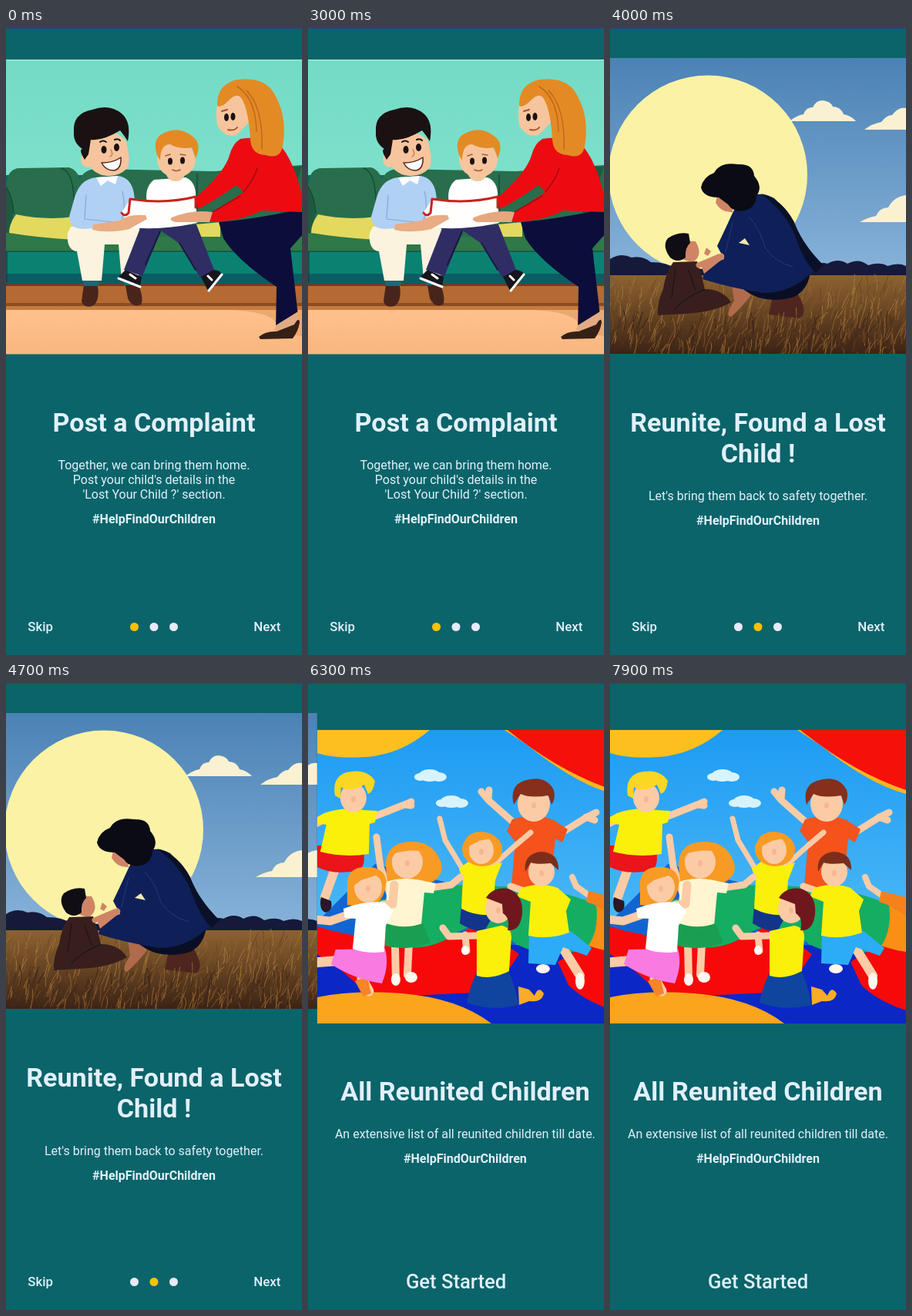
An HTML page for the animation above (8000 ms loop, 384 px wide and 814 px high).

```html
<!DOCTYPE html>
<html lang="en">
<head>
<meta charset="utf-8">
<title>Onboarding</title>
<style>
  html, body { margin: 0; width: 100%; height: 100%; overflow: hidden; background: #0b6469; }
  #stage { display: block; width: 100%; height: 100%; }
  text { font-family: Roboto, sans-serif; font-size: 16px; fill: #e1f0fc; }
  .mid { text-anchor: middle; }
  .title { font-size: 34.13px; font-weight: 700; }
  .tag { font-weight: 700; }
  .nav { font-size: 16.8px; font-weight: 500; }
  .start { font-size: 25.6px; font-weight: 500; }
</style>
</head>
<body>
<svg id="stage" viewBox="0 0 384 814"></svg>
<script>
const W = 384, LOOP = 8000;
const swipes = [3098, 5921];
const stage = document.getElementById('stage');

// Drawing helpers
const fill = (color, d) => `<path fill="${color}" d="${d}"/>`;
const line = (color, w, d) =>
  `<path fill="none" stroke="${color}" stroke-width="${w}" stroke-linecap="round" stroke-linejoin="round" d="${d}"/>`;
const oval = (color, x, y, rx, ry = rx) => `<ellipse fill="${color}" cx="${x}" cy="${y}" rx="${rx}" ry="${ry}"/>`;
const rect = (color, x, y, w, h) => `<rect fill="${color}" x="${x}" y="${y}" width="${w}" height="${h}"/>`;
const label = (cls, y, s, x = W / 2) => `<text class="${cls}" x="${x}" y="${y}">${s}</text>`;
const fade = (id, from, to) =>
  `<linearGradient id="${id}" x2="0" y2="1"><stop stop-color="${from}"/><stop offset="1" stop-color="${to}"/></linearGradient>`;
const picture = (y, h, parts) =>
  `<svg y="${y}" width="${W}" height="${h}" viewBox="0 ${y} ${W} ${h}">${parts.join('')}</svg>`;

let seed = 7;
const rnd = () => (seed = seed * 16807 % 2147483647) / 2147483647;

function family() {
  const skin = '#f6c59d', ink = '#1b1113', hair = '#e48a25';
  return picture(41, 382.5, [
    rect('url(#mint)', 0, 41, W, 150),
    // Sofa and floor
    fill('#286e4c', 'M0 204Q2 182 18 182L82 181Q92 184 96 196Q102 183 118 183L270 186L384 178V292H0Z'),
    fill('#1f5a40', 'M0 206Q8 218 10 240L4 266L0 268ZM358 180Q350 205 356 240H384V232Q370 215 384 180Z'),
    fill('#2f7848', 'M0 266Q45 274 90 271H384V291H0Z'),
    line('#174a36', 1.5, 'M0 206Q9 220 10 240M72 182Q90 188 88 238M248 190V248'),
    fill('#e3d95e', 'M13 242Q50 250 88 245V275Q40 272 4 266Q4 254 13 242ZM246 255L278 252V271H246Z'),
    rect('#0a8272', 0, 290, W, 32), rect('#0c5c63', 0, 319, W, 15),
    line('#123d38', 1.2, 'M0 290H384M1 290V330'),
    rect('#68401f', 0, 332, W, 4), rect('#b46a32', 0, 335, W, 25),
    rect('#8c4c20', 0, 357, W, 5), rect('#c67b3f', 0, 361, W, 5),
    rect('url(#floor)', 0, 366, W, 58),
    fill('#e9a970', 'M290 366Q340 368 350 382Q362 398 384 400V366Z'),
    // Man
    fill('#49241b', 'M101 333L119 335Q122 355 112 361Q101 364 98 355ZM155 334L172 333Q179 352 175 359Q164 364 158 351Z'),
    fill('#176a75', 'M99 321H123L120 335H101ZM150 321H172V334H154Z'),
    fill('#fbf3de', 'M84 258L165 252Q180 262 174 282L172 327H150L146 281H128L124 328H99L92 290Q78 288 80 266Z'),
    fill('#b0d1f4', 'M117 194Q96 196 89 220L82 245Q82 260 99 261L158 257Q170 240 166 215Q163 195 146 192Z'),
    line('#86a9d2', 1.2, 'M104 217L102 248L140 252M150 250Q156 230 151 212'),
    fill('#fff', 'M117 194L123 205L132 198L142 203L145 192Z'),
    oval(skin, 106, 171, 9, 10),
    fill(skin, 'M102 143Q130 124 155 145Q162 168 158 181Q148 193 131 192Q109 190 103 166Z'),
    fill(ink, 'M102 171Q94 158 99 157Q87 149 88 135Q86 111 112 106Q134 98 150 111Q163 122 158 147Q153 139 148 133Q125 147 110 145L107 164Z'),
    line(ink, 2, 'M122 148Q126 145 130 148M141 145Q145 143 148 146'),
    oval(ink, 127, 158, 3.5, 5), oval(ink, 143.5, 155, 3.5, 5),
    line('#cb7d59', 1.5, 'M136 158Q140 165 135 167'),
    fill('#fff', 'M124 175Q139 175 149 168Q150 183 140 185Q129 185 124 175Z'),
    line('#592018', 1.5, 'M124 175Q139 175 149 168Q150 183 140 185Q129 185 124 175Z'),
    // Boy
    fill('#fff', 'M192 197Q179 207 183 228L246 224Q248 200 233 194Z'),
    fill(skin, 'M207 189H233Q229 199 220 199Q211 199 207 189Z'),
    oval(skin, 221, 171, 25, 23),
    fill(hair, 'M196 165Q190 147 200 139Q222 125 241 140Q255 149 246 169L241 155Q225 158 213 151Q200 151 200 172Z'),
    oval(ink, 213, 173, 3, 4.5), oval(ink, 229, 172, 3, 4.5),
    line('#a85d3b', 1.5, 'M216 184Q221 187 226 184M207 166L213 164M226 164L233 165'),
    fill('#302d65', 'M174 260L247 255L270 314L252 324L225 280L201 263L177 322L153 314Z'),
    line('#171944', 2, 'M200 264L181 307M225 279L246 314'),
    fill('#17151d', 'M155 314L176 323L174 335L145 324ZM253 323L269 314Q282 315 278 322L262 341Z'),
    line('#fff', 3, 'M146 325L174 336M280 320L263 341M161 320L168 325M262 322L267 327'),
    // Book
    fill('#fffefd', 'M161 223Q204 228 246 218L248 253Q204 263 160 259L150 239Z'),
    line('#c9231e', 3, 'M150 240Q154 246 159 240L161 222Q207 229 246 219V233'),
    fill('#e9ac83', 'M113 255L148 250Q158 241 181 243L183 248L160 261Q132 267 112 262Z'),
    // Woman
    fill('#0c0d3b', 'M276 252Q324 248 384 235V269L369 286L379 374L350 391L351 336Q300 302 282 273Z'),
    fill('#e3ab84', 'M350 386L379 368L379 383L369 397L347 395Z'),
    fill('#352015', 'M328 401Q337 393 351 394L374 385Q380 374 381 382Q379 394 372 403L330 404Z'),
    fill('#ed0b12', 'M304 144Q332 139 356 153Q372 170 384 216V239L332 237Q299 253 264 251L268 239L308 213L299 204Q270 225 249 235L246 220Q284 187 290 165Q294 150 304 144Z'),
    line('#a30a14', 1.5, 'M308 213Q322 196 326 182M268 239L304 218'),
    fill('#e6a780', 'M268 239Q242 235 215 246Q211 250 220 252L264 252Z'),
    fill(skin, 'M279 84Q270 102 274 126Q283 143 299 139L318 120L309 87Z'),
    fill(hair, 'M274 101Q273 73 300 67Q339 62 351 91Q365 118 359 153Q356 171 337 165Q318 164 317 145Q315 108 306 92Q300 82 288 95Q279 104 274 101Z'),
    line('#bf681c', 1.5, 'M312 81Q334 104 332 157M300 76Q324 91 325 134'),
    oval(ink, 286, 116, 3, 5), oval(ink, 294.5, 115, 3, 5),
    line('#a84f32', 2, 'M288 132Q296 134 300 129M280 108L287 106'),
    rect('#c9f0e7', 0, 41, W, 1)
  ]);
}

function field() {
  const skin = '#cf8565', black = '#0b0b15', dress = '#0f1f58', cream = '#faf1d2';
  const grass = (n, top, span, tones) => Array.from({ length: n }, () => {
    const x = rnd() * 400 - 8, y = top + rnd() * span, h = 8 + rnd() * 18;
    return line(tones[Math.floor(rnd() * tones.length)], 1,
      `M${x.toFixed(1)} ${y.toFixed(1)}q${(rnd() * 5).toFixed(1)} ${(-h / 2).toFixed(1)} ${(rnd() * 13 - 2).toFixed(1)} ${(-h).toFixed(1)}`);
  }).join('');
  return picture(39, 384, [
    rect('url(#dusk)', 0, 39, W, 284),
    oval('#fbf2a6', 127, 190.5, 129, 129),
    fill(cream, 'M233 121Q241 114 251 112Q254 103 263 103Q267 94 276 94Q286 95 289 102Q299 102 303 112Q313 114 319 121Z'),
    fill(cream, 'M330 132Q340 124 352 122Q359 113 366 113Q374 102 384 104V132Z'),
    fill(cream, 'M324 252Q334 246 345 244Q350 233 361 233Q368 219 384 217V252Z'),
    fill('#151a3a', 'M0 300Q14 291 28 298Q42 295 53 304Q74 304 84 312L256 315Q270 302 282 306Q296 298 308 306Q323 298 335 308Q350 303 360 309Q374 304 384 309V324H0Z'),
    rect('url(#soil)', 0, 321, W, 104),
    grass(260, 340, 45, ['#8f6430', '#6b4723', '#a0743a', '#7c5429']),
    grass(190, 385, 40, ['#7c5026', '#57371d', '#44291a', '#8f6230']),
    // Mother
    fill('#4f251f', 'M211 347L244 346Q258 370 246 377L206 372Z'),
    fill('#b06a4c', 'M158 334L187 342Q171 363 157 375Q148 374 161 354Z'),
    fill('#0a0e25', 'M160 318L260 304Q262 337 239 349Q200 360 174 340Z'),
    fill(dress, 'M160 238Q184 205 213 221Q236 242 252 282L272 309L258 321Q232 344 199 344Q154 337 120 326L126 306L148 300L139 283Q150 260 160 238Z'),
    fill('#0a1027', 'M196 215Q223 222 239 252Q249 280 277 308L267 318Q251 303 241 272Q229 240 196 215Z'),
    line('#25397b', 1, 'M180 245Q194 259 201 285Q214 304 237 310M159 253L150 290'),
    fill('#f1e9aa', 'M167 279L175 273L181 282Z'),
    fill(skin, 'M125 285L131 290L127 296L122 293ZM118 308L145 292Q153 297 142 303L122 319Z'),
    fill(skin, 'M140 213L158 212L159 239Q144 240 137 227Z'),
    fill(black, 'M141 220Q121 220 118 207Q121 193 135 188Q143 173 166 177Q186 176 187 192Q199 206 190 218Q189 234 174 237Q160 240 153 229Z'),
    // Child
    fill(skin, 'M91 276L111 277Q121 294 109 303Q92 304 87 291Z'),
    fill('#100d15', 'M102 267L104 279Q97 285 98 298Q88 306 78 298Q67 283 75 273Q88 264 102 267Z'),
    fill('#381f1d', 'M82 304Q72 317 69 339Q61 356 62 373L97 371Q136 369 157 356Q146 339 123 339Q119 320 113 303Z'),
    line('#221519', 1.5, 'M85 312L80 350M122 340Q100 348 85 364M102 315L111 340'),
    line(skin, 7, 'M115 308L141 297'),
    grass(170, 388, 48, ['#94642f', '#4a2e19', '#7d5127', '#382217'])
  ]);
}

function party() {
  const skin = '#fbcba6', ginger = '#f89b24', lemon = '#fbf00a', brown = '#7c2e1b';
  const limb = (d, w = 9) => line(skin, w, d);
  const face = (x, y, r = 17) => oval(skin, x, y, r, r + 2) + oval('#f7b697', x, y + 2, 3, 4);
  const puff = (x, y) => oval('#d8f3fb', x, y, 14, 8) + oval('#d8f3fb', x + 12, y + 2, 10, 6) + oval('#d8f3fb', x - 12, y + 2, 8, 5);
  return picture(61, 381, [
    rect('url(#day)', 0, 61, W, 381),
    fill('#fcbf1f', 'M0 61H146Q110 92 65 96Q25 99 0 91Z'),
    fill('#fcb51f', 'M243 61L272 80Q335 131 384 144V61Z'),
    fill('#f5100a', 'M247 61H384V139Q315 116 247 61Z'),
    puff(146, 120), puff(174, 154),
    // Parachute
    fill('#1265d1', 'M75 235L180 262L250 285L260 350H0V310Z'),
    fill('#0b27c6', 'M0 340H384V442H0Z'),
    fill('#f7090a', 'M0 316Q45 331 91 330Q172 349 205 310L262 352L250 370L205 402L120 406L62 400L30 372L0 352Z'),
    fill('#f7090a', 'M312 362L352 338L384 342V425Q345 412 326 392Z'),
    fill('#15ad62', 'M78 283Q130 267 190 262L266 265Q327 270 366 290Q364 327 352 345Q300 360 260 340Q213 303 182 324Q140 354 92 338Z'),
    fill('#f98f14', 'M362 288L384 294V349Q365 346 352 341Q366 320 362 288Z'),
    fill('#fba51c', 'M0 408Q48 398 110 403Q183 409 226 442H0Z'),
    // Back left
    limb('M24 239L10 278', 12), fill('#2b1725', 'M5 278L18 283Q21 295 11 298Q2 295 5 278Z'),
    fill('#ea141a', 'M0 211H55Q66 226 57 242Q25 251 0 239Z'),
    limb('M70 175L113 158L122 154M113 158L122 159M8 178L-4 184'),
    fill(lemon, 'M9 169Q34 160 61 165L78 166L75 181L68 183L67 222Q34 227 4 219L12 184L0 182V174Z'),
    face(47, 149), fill('#fbd622', 'M23 146Q19 122 38 116Q64 110 75 127Q73 142 66 144L61 132Q43 143 31 135L30 150Z'),
    // Back right
    limb('M258 184L222 152L213 141M222 150L223 139'), limb('M318 194L350 174L362 168M349 174L360 178'),
    fill('#f4531c', 'M253 177Q282 168 307 178L325 190L318 207L309 202L304 250Q278 270 252 264L257 206L246 192Z'),
    face(281, 157, 21), fill('#862f1c', 'M255 158Q249 134 268 127Q296 118 307 139Q310 150 304 158L300 146Q276 150 264 144Z'),
    // Centre
    limb('M192 327L194 348', 9), oval('#fff', 192, 347, 5, 6),
    fill('#12358b', 'M187 289L231 297L216 324Q197 320 185 312Z'),
    limb('M189 242L166 204L159 176M228 237L257 211L277 194', 7),
    fill(lemon, 'M184 241L196 232L227 237L240 233L231 256L228 301Q206 303 187 293L189 256Z'),
    oval(ginger, 214, 216, 26, 22), face(213, 217, 16), fill(ginger, 'M191 215Q189 194 213 193Q237 195 237 214L224 202L210 205Z'),
    // Middle left
    limb('M101 338L102 382M119 338L117 379', 10), oval('#fff6ef', 102, 385, 6, 8), oval('#fff6ef', 122, 382, 8, 7),
    limb('M94 273L82 238L77 200M139 267L174 262L186 252'),
    fill(ginger, 'M89 237Q89 207 121 206Q150 205 160 231Q167 249 148 259Q117 269 91 257Z'),
    fill('#fff6d1', 'M90 258Q113 250 143 258L154 260L151 273L139 272L135 315Q111 321 88 313L90 275Z'),
    fill('#1a9f52', 'M87 311Q112 321 137 312L147 337Q116 349 88 341Z'),
    face(117, 232, 20), fill(ginger, 'M92 236Q92 207 118 208Q145 211 143 238L132 218Q119 216 101 221Z'),
    // Right
    limb('M318 343L341 380', 12), oval('#fff6ef', 341, 387, 6, 11), oval('#fff6ef', 293, 371, 9, 6),
    limb('M274 272L251 264'),
    fill('#2cacf6', 'M275 326L329 322L356 344L350 354L319 343L309 366L274 364Z'),
    fill(lemon, 'M265 266Q290 258 312 266L329 281L323 296L327 324Q299 334 274 328L277 284L259 277Z'),
    face(291, 245), fill(brown, 'M270 245Q267 222 290 219Q314 220 313 243L303 234Q284 236 277 233Z'),
    // Edge
    limb('M356 278L336 264L331 252', 8),
    fill('#f5801c', 'M352 270L384 278V302L360 288L349 284Z'),
    // Front left
    limb('M33 360L-3 363M58 384L67 400', 13), fill('#f58526', 'M49 387L65 381L70 403L60 407Z'),
    fill('#f97be2', 'M24 346L88 345Q94 366 84 390Q49 385 18 365Z'),
    limb('M43 300L17 309L-3 307M85 288L98 287L100 262', 11),
    fill(ginger, 'M39 258Q41 238 65 239Q91 240 89 262Q87 282 70 292L39 288Z'),
    fill('#fff', 'M34 293Q62 282 88 285L99 296L89 315L87 349Q63 352 46 345L50 306L36 305Z'),
    face(66, 265, 18), fill(ginger, 'M41 268Q42 238 65 239Q88 239 90 260L76 250L57 256Z'),
    // Front centre
    limb('M207 328L171 329L163 318'),
    fill('#f9ac28', 'M261 394L275 398L282 406Q287 392 294 403Q292 415 275 413L262 418Z'),
    fill('#0f459f', 'M207 376L248 373Q258 395 261 418Q226 427 194 415Q198 394 207 376Z'),
    fill(lemon, 'M207 322L239 315Q252 317 252 330L249 374Q226 386 207 380Z'),
    face(235, 293, 17),
    fill('#70171d', 'M219 279Q228 264 248 267Q268 275 266 300Q263 323 247 321Q251 305 241 299L240 287Z')
  ]);
}

const tag = y => label('mid tag', y, '#HelpFindOurChildren');
const pages = [
  family() + label('mid title', 524, 'Post a Complaint') +
    label('mid', 573, 'Together, we can bring them home.') +
    label('mid', 592, "Post your child's details in the") +
    label('mid', 611, "'Lost Your Child ?' section.") + tag(643),
  field() + label('mid title', 524, 'Reunite, Found a Lost') + label('mid title', 564, 'Child !') +
    label('mid', 613, "Let's bring them back to safety together.") + tag(645),
  party() + label('mid title', 542, 'All Reunited Children') +
    label('mid', 591, 'An extensive list of all reunited children till date.') + tag(623)
];

stage.innerHTML = '<defs>' +
  fade('mint', '#73dbc5', '#7de0cb') + fade('floor', '#ffc18c', '#f8b680') +
  fade('dusk', '#4b82b5', '#88b3da') + fade('soil', '#8d6231', '#3a2214') + fade('day', '#1d9bf3', '#62c6f8') + '</defs>' +
  rect('#0b6469', 0, 0, W, 814) +
  '<g id="track">' + pages.map((p, i) => `<g transform="translate(${i * W})">${p}</g>`).join('') + '</g>' +
  rect('#3d3c80', 0, 0, W, 1) +
  '<g id="nav">' + label('nav', 783, 'Skip', 28.3) +
  [166.5, 192, 217.5].map(x => `<circle class="dot" cx="${x}" cy="777.5" r="5.5"/>`).join('') +
  label('nav', 783, 'Next', 321.3) + '</g>' +
  '<g id="start">' + label('mid start', 786, 'Get Started') + '</g>';

const [track, nav, start] = ['track', 'nav', 'start'].map(id => document.getElementById(id));
const dots = stage.querySelectorAll('.dot');

// Critically damped page spring
function settle(ms) {
  const k = Math.max(0, ms) * .014;
  return 1 - (1 + k) * Math.exp(-k);
}

function draw(now) {
  const t = now % LOOP;
  const pos = swipes.reduce((sum, s) => sum + settle(t - s), 0);
  const page = Math.round(pos);
  track.setAttribute('transform', `translate(${(-pos * W).toFixed(2)})`);
  dots.forEach((d, i) => d.setAttribute('fill', i === page ? '#ffc107' : '#e8eaf6'));
  nav.style.display = page < 2 ? '' : 'none';
  start.style.display = page < 2 ? 'none' : '';
}

const begin = performance.now();
function tick() {
  draw(performance.now() - begin);
  requestAnimationFrame(tick);
}
tick();
</script>
</body>
</html>
```
